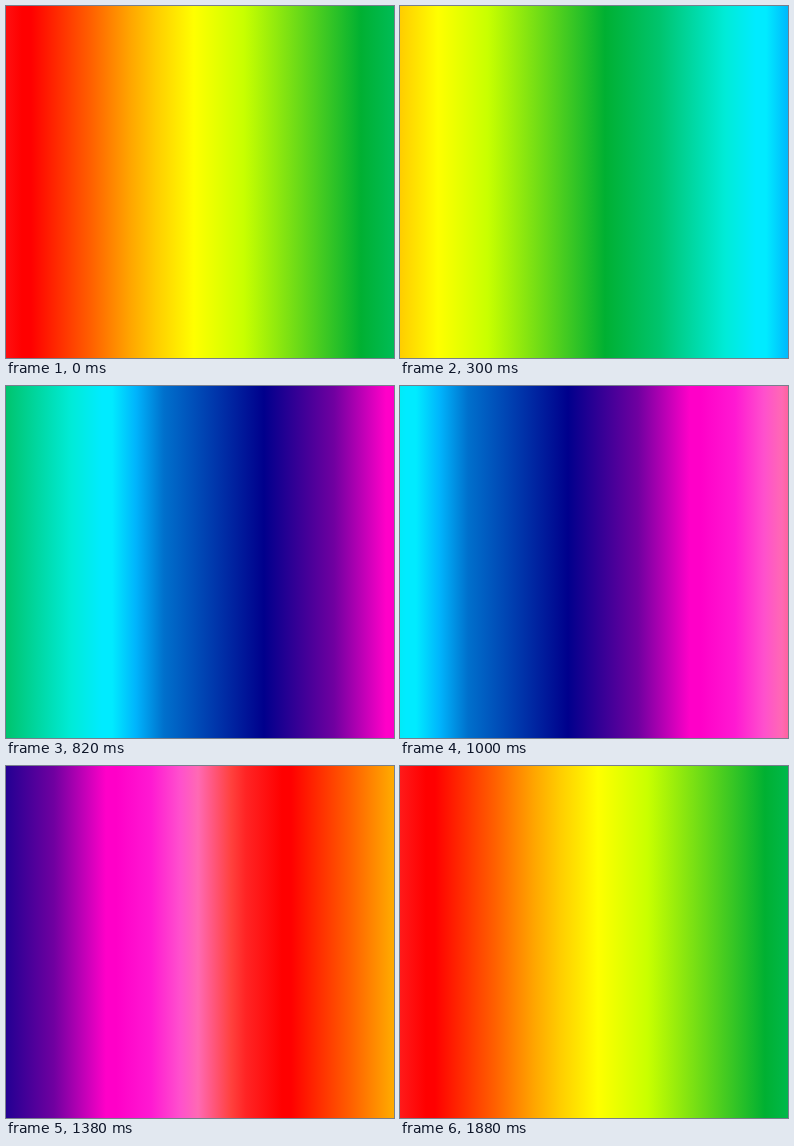
Write an HTML page that moves like this. It is 388 by 352 pixels and loops after 1900 ms.

```html
<!DOCTYPE html>
<html lang="en">
<head>
<meta charset="utf-8">
<title>Rainbow</title>
<style>
html, body { margin: 0; width: 100%; height: 100%; overflow: hidden; }
#band {
  width: 100%;
  height: 100%;
  background: linear-gradient(90deg,
    rgb(255 16 16) 0, rgb(255 0 0) 16px, rgb(255 0 0) 25px,
    rgb(255 96 0) 85px, rgb(255 165 0) 124px, rgb(255 205 0) 150px,
    rgb(255 255 0) 188px, rgb(200 255 0) 238px,
    rgb(0 176 50) 355px, rgb(0 196 110) 410px, rgb(0 235 215) 475px,
    rgb(0 235 255) 506px, rgb(0 235 255) 516px, rgb(0 180 252) 540px,
    rgb(0 112 204) 568px, rgb(0 0 140) 668px,
    rgb(112 0 160) 738px, rgb(255 0 200) 790px, rgb(255 0 200) 800px,
    rgb(255 25 210) 835px, rgb(255 80 205) 864px, rgb(255 105 180) 882px,
    rgb(255 65 62) 915px, rgb(255 36 36) 930px, rgb(255 16 16) 950px);
  background-size: 950px 100%;
}
</style>
</head>
<body>
<div id="band"></div>
<script>
const band = document.getElementById('band');
const LOOP = 1900, STEP = 20, SHIFT = 10;
const start = performance.now();

function draw() {
  const t = (performance.now() - start) % LOOP;
  band.style.backgroundPositionX = -SHIFT * Math.floor(t / STEP) + 'px';
  requestAnimationFrame(draw);
}
draw();
</script>
</body>
</html>
```
